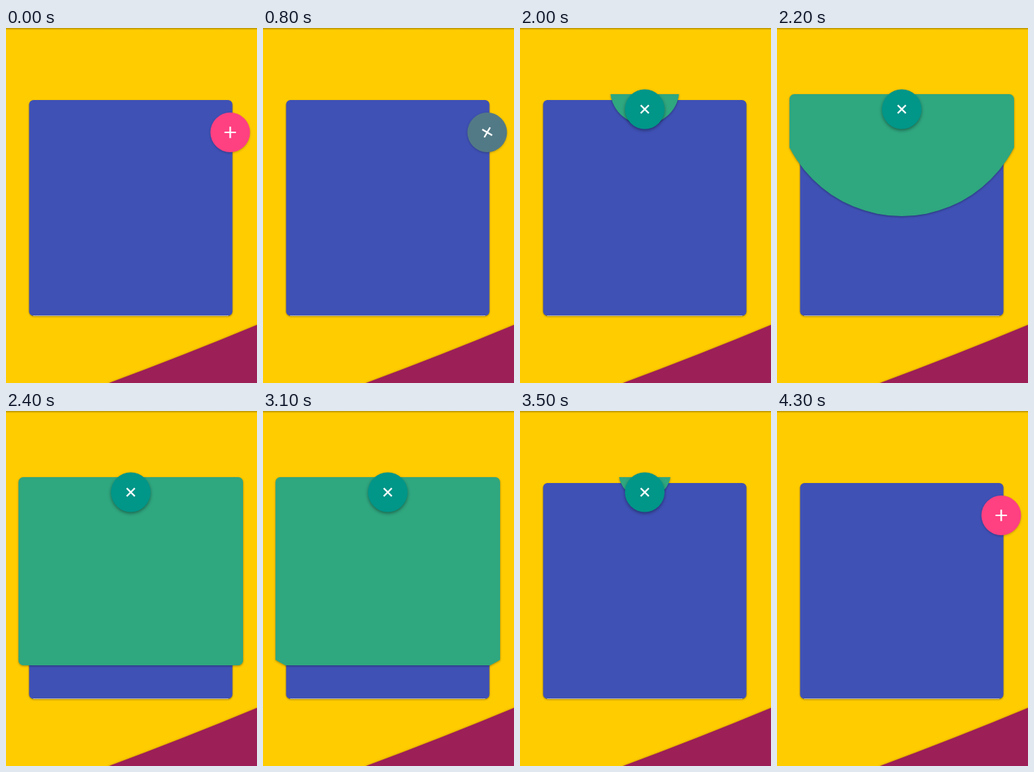
Write an HTML page that moves like this. It is 342 px wide and 483 px high and loops after 5.4 s.

```html
<!DOCTYPE html>
<html lang="en">
<head>
<meta charset="utf-8">
<title>Button to sheet</title>
<style>
  html, body { margin: 0; width: 100%; height: 100%; overflow: hidden; background: #fc0; }
  svg { display: block; width: 342px; height: 483px; }
  .card { filter: drop-shadow(0 1px 1.2px rgba(0, 0, 0, .4)); }
  .sheet { filter: drop-shadow(0 1.5px 1.5px rgba(0, 0, 0, .35)); }
  .corner { filter: drop-shadow(0 0 1.5px rgba(90, 30, 0, .4)); }
</style>
</head>
<body>
<svg viewBox="0 0 342 483">
  <defs>
    <linearGradient id="bar" x2="0" y2="1">
      <stop stop-color="#000" stop-opacity=".3"/>
      <stop offset="1" stop-color="#000" stop-opacity="0"/>
    </linearGradient>
    <clipPath id="reveal"><circle id="hole" cx="170" cy="84" r="0"/></clipPath>
  </defs>
  <rect width="342" height="483" fill="#fc0"/>
  <rect width="342" height="3" fill="url(#bar)"/>
  <path class="corner" d="M139 483.5Q243 445 343 403.5V484H139Z" fill="#9c1f57"/>
  <g class="card">
    <rect x="31.5" y="98" width="277" height="293.5" rx="6" fill="#3f51b5"/>
  </g>
  <path d="M37 391.5H303" stroke="#fff" stroke-opacity=".5"/>
  <g class="sheet" id="sheet">
    <rect x="17" y="90" width="306" height="256" rx="6.5" fill="#2fa77f" clip-path="url(#reveal)"/>
  </g>
  <g id="fab">
    <circle id="disc" r="27"/>
    <path id="icon" d="M-7.8 0H7.8M0 -7.8V7.8" stroke="#fff" stroke-width="2.2"/>
  </g>
</svg>
<script>
  const LOOP = 5400, STEP = 100;
  const HOME = [305.5, 142], BEND = [238, 141], DOCK = [170, 110.5];
  const PINK = [255, 64, 129], TEAL = [0, 150, 136];
  const [hole, sheet, fab, disc, icon] =
    ['hole', 'sheet', 'fab', 'disc', 'icon'].map(id => document.getElementById(id));

  const mix = (a, b, k) => a + (b - a) * k;
  const ease = (t, from, to) => {
    const k = Math.min(1, Math.max(0, (t - from) / (to - from)));
    return (1 - Math.cos(Math.PI * k)) / 2;
  };
  // Rises over the first span, falls back over the second
  const pulse = (t, a, b, c, d) => ease(t, a, b) - ease(t, c, d);
  const arc = k => HOME.map((h, i) =>
    mix(mix(h, BEND[i], k), mix(BEND[i], DOCK[i], k), k));

  function draw(t) {
    const morph = pulse(t, 640, 900, 4080, 4300);
    const lift = pulse(t, 1400, 1500, 4150, 4300);
    const [x, y] = arc(pulse(t, 1650, 1960, 3850, 4180));
    const radius = t < 3000
      ? mix(27, 340, ease(t, 1896, 2534))
      : mix(297, 27, ease(t, 3093, 3552));

    sheet.style.display = t >= 1960 && t < 3700 ? '' : 'none';
    hole.setAttribute('r', radius);
    fab.setAttribute('transform', `translate(${x} ${y})`);
    fab.style.filter =
      `drop-shadow(0 ${mix(1, 2, lift)}px ${mix(1.5, 2.2, lift)}px rgba(0,0,0,${mix(.25, .38, lift)}))`;
    disc.setAttribute('fill', `rgb(${PINK.map((p, i) => Math.round(mix(p, TEAL[i], morph)))})`);
    icon.setAttribute('transform', `rotate(${45 * morph})`);
  }

  // The motion runs at ten pictures per second
  function tick() {
    draw(Math.floor(performance.now() % LOOP / STEP) * STEP);
    requestAnimationFrame(tick);
  }
  tick();
</script>
</body>
</html>
```
